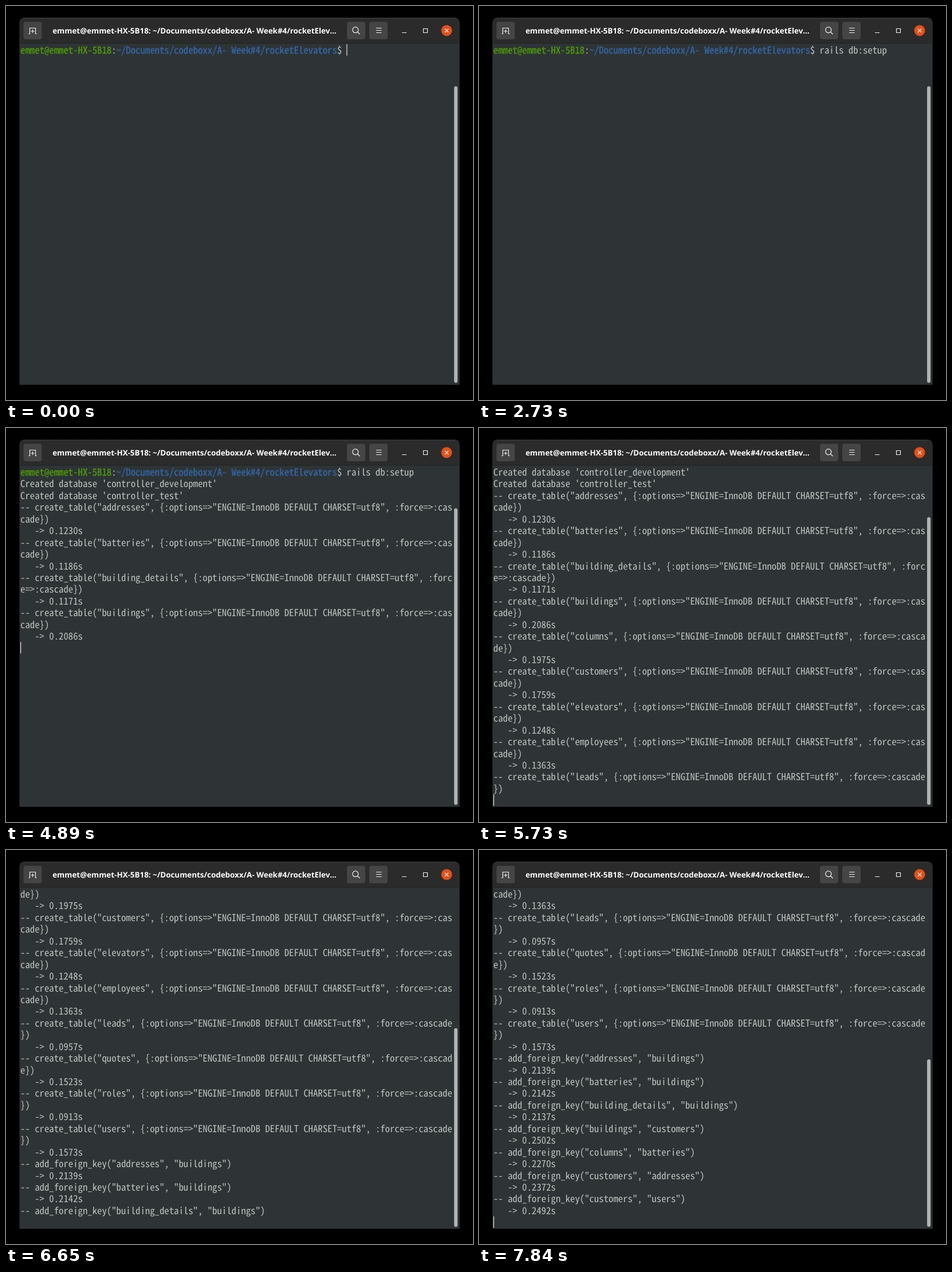
These frames come from a looping animation (815 by 687 pixels, 8000 ms). An HTML page:

```html
<!DOCTYPE html>
<html lang="en">
<head>
<meta charset="utf-8">
<title>Terminal</title>
<style>
  html, body { margin: 0; width: 100%; height: 100%; overflow: hidden; background: #000; }
  svg { display: block; width: 815px; height: 687px; }
  text { white-space: pre; text-rendering: geometricPrecision; }
  #title { font: bold 13.4px "Open Sans", "Noto Sans", sans-serif; fill: #fff; text-anchor: middle; }
  #rows { font-family: "Noto Sans Mono CJK JP", "Noto Sans Mono", monospace; fill: #bfc3bc; }
  .user, .path { stroke-width: 0.4; }
  .user { fill: #4e9a06; stroke: #4e9a06; }
  .path { fill: #3465a4; stroke: #3465a4; }
  .icon { fill: none; stroke: #f0f0f0; stroke-width: 1.2; }
</style>
</head>
<body>
<svg viewBox="0 0 815 687">
  <path d="M23.5 660.5V28.5a8 8 0 0 1 8-8H783.5a8 8 0 0 1 8 8V660.5z" fill="#2e3436"/>
  <path d="M23.5 65V28.5a8 8 0 0 1 8-8H783.5a8 8 0 0 1 8 8V65z" fill="#2b2b2b"/>
  <path d="M31 21.5H784" stroke="#3b3b3b"/>
  <path d="M24 65H791" stroke="#1f2020"/>
  <g fill="#454545">
    <rect x="30.5" y="27.5" width="32" height="30.5" rx="4"/>
    <rect x="595" y="27.5" width="32" height="30.5" rx="4"/>
    <rect x="634" y="27.5" width="32" height="30.5" rx="4"/>
  </g>
  <circle cx="769" cy="42.8" r="9.5" fill="#e2501b"/>
  <g class="icon">
    <path d="M39.5 48.5H41.5V38.5H51.5V48.5H53.5M46.5 41V47M43.5 44H49.5"/>
    <circle cx="609.8" cy="41.7" r="5"/>
    <path d="M613.4 45.3L617.5 49.3M646 38.5H655.5M646 42.5H655.5M646 46.5H655.5"/>
    <path d="M691 46.5H699M728.5 39.5H735.5V46.5H728.5zM765.8 39.6L772.2 46M772.2 39.6L765.8 46"/>
  </g>
  <text id="title" x="329" y="47.5">emmet@emmet-HX-5B18: ~/Documents/codeboxx/A- Week#4/rocketElev…</text>
  <g id="rows"></g>
  <rect id="cursor" width="1.2" height="20" fill="#e4e6e2"/>
  <rect id="thumb" x="782" width="6" rx="3" fill="#b1b3b2"/>
</svg>
<script>
const LOOP = 8000, COLS = 90, ROWS = 29, LEFT = 25, TOP = 66.4, CELL = 8.378, LINE = 20.44;
const PROMPT = '<tspan class="user">emmet@emmet-HX-5B18</tspan>:' +
  '<tspan class="path">~/Documents/codeboxx/A- Week#4/rocketElevators</tspan>$ ';
const PROMPT_COLS = PROMPT.replace(/<.*?>/g, '').length;
const COMMAND = 'rails db:setup';
const KEYS = [500, 580, 660, 870, 960, 1110, 1220, 1330, 1650, 2050, 2360, 2510, 2620, 2730];

const tables = `addresses 0.1230,batteries 0.1186,building_details 0.1171,buildings 0.2086,
columns 0.1975,customers 0.1759,elevators 0.1248,employees 0.1363,leads 0.0957,
quotes 0.1523,roles 0.0913,users 0.1573`;
const keys = `addresses buildings 0.2139,batteries buildings 0.2142,building_details buildings 0.2137,
buildings customers 0.2502,columns batteries 0.2270,customers addresses 0.2372,customers users 0.2492`;
const parse = list => list.split(/,\s*/).map(item => item.split(' '));

const output = ["Created database 'controller_development'", "Created database 'controller_test'"];
for (const [name, secs] of parse(tables)) output.push(
  `-- create_table("${name}", {:options=>"ENGINE=InnoDB DEFAULT CHARSET=utf8", :force=>:cascade})`,
  `   -> ${secs}s`);
for (const [from, to, secs] of parse(keys)) output.push(
  `-- add_foreign_key("${from}", "${to}")`, `   -> ${secs}s`);
const lines = ['', ...output.flatMap(s => s.match(new RegExp(`.{1,${COLS}}`, 'g')))];

// [time, row the cursor has reached]
const PROGRESS = [[0, 0], [4190, 2], [4290, 3], [4390, 5], [4480, 6], [4580, 9], [4680, 12],
  [4890, 15], [5090, 18], [5190, 20], [5370, 23], [5490, 24], [5630, 27], [5730, 29],
  [5830, 30], [5980, 33], [6070, 36], [6230, 39], [6440, 41], [6650, 44], [6870, 46],
  [7120, 48], [7350, 50], [7590, 51], [7840, 53]];
const HIDDEN = [[2050, 4190], [5830, 7590]];

const $ = id => document.getElementById(id);
const set = (el, attrs) => { for (const k in attrs) el.setAttribute(k, attrs[k]); };

const rows = Array.from({ length: ROWS }, (_, i) => {
  const row = document.createElementNS('http://www.w3.org/2000/svg', 'text');
  set(row, { x: LEFT, y: TOP + 16.6 + i * LINE });
  return $('rows').appendChild(row);
});

// Pick the font size whose advance equals one terminal cell.
$('rows').style.fontSize = '16px';
rows[0].textContent = '0'.repeat(COLS);
$('rows').style.fontSize = 16 * CELL * COLS / rows[0].getComputedTextLength() + 'px';

let shown = '';
function draw(now) {
  const t = now % LOOP;
  const typed = KEYS.filter(k => k <= t).length;
  const end = PROGRESS.filter(p => p[0] <= t).pop()[1];
  const top = Math.max(0, end - ROWS + 1);

  if (shown !== typed + ':' + end) {
    shown = typed + ':' + end;
    rows.forEach((row, i) => {
      const n = top + i;
      row.innerHTML = n === 0 ? PROMPT + COMMAND.slice(0, typed) : n < end ? lines[n] : '';
    });
    const height = 16764 / (top + 32.43);
    set($('thumb'), { y: 657 - height, height });
    set($('cursor'), {
      x: end ? LEFT : LEFT + (PROMPT_COLS + typed) * CELL - 0.4,
      y: TOP + (end - top) * LINE
    });
  }
  const off = HIDDEN.some(([a, b]) => t >= a && t < b);
  $('cursor').style.visibility = off ? 'hidden' : 'visible';
  requestAnimationFrame(draw);
}
draw(performance.now());
</script>
</body>
</html>
```
